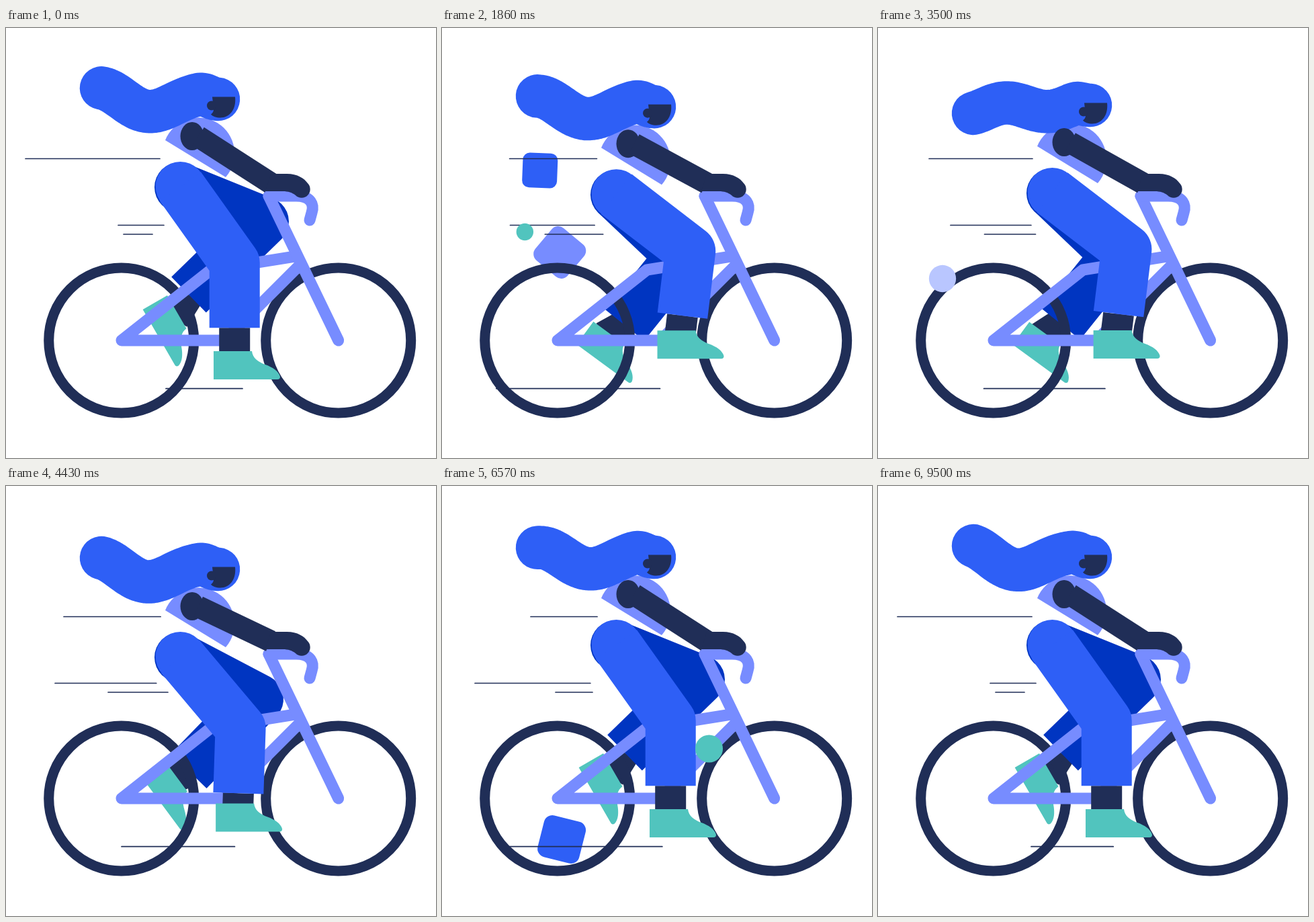
An HTML page with a canvas that plays this animation: 640 px wide and 640 px high, repeating every 9.57 s.

```html
<!DOCTYPE html>
<html lang="en">
<head>
<meta charset="utf-8">
<title>Cyclist</title>
<style>
html, body { margin: 0; width: 100%; height: 100%; overflow: hidden; background: #fff; }
canvas { display: block; }
</style>
</head>
<body>
<canvas id="stage" width="640" height="640"></canvas>
<script>
const ctx = document.getElementById('stage').getContext('2d');
const LOOP = 9570;
const NAVY = '#202e57', BLUE = '#2e5ff6', DEEP = '#0035c1', LILAC = '#778cff', TEAL = '#51c4be', PALE = '#b9c6ff';

const lerp = (a, b, k) => a + (b - a) * k;
const mix = (p, q, k) => [lerp(p[0], q[0], k), lerp(p[1], q[1], k)];
const clamp = k => Math.max(0, Math.min(1, k));
const smooth = k => k * k * (3 - 2 * k);
const ramp = (a, b, x) => smooth(clamp((x - a) / (b - a)));
const polar = ([x, y], deg, r) => [x + r * Math.cos(deg * Math.PI / 180), y + r * Math.sin(deg * Math.PI / 180)];

// Key times shared by the slow body, hair and speed line motion
const BEATS = [0, 1210, 2570, 4430, 6570, 7930, 9500, LOOP];
const BOB = [0, 21, 0, 18, 0, 7, 0, 0];
const HAIR_PHASE = [.21, .93, 1.46, 2.23, 3.15, 3.66, 4.26, 4.28];

function track(values, t, ease = k => k) {
  let i = 1;
  while (i < BEATS.length - 1 && t > BEATS[i]) i++;
  return lerp(values[i - 1], values[i], ease(clamp((t - BEATS[i - 1]) / (BEATS[i] - BEATS[i - 1]))));
}

function line(points, width, color, cap = 'round') {
  ctx.beginPath();
  points.forEach(p => ctx.lineTo(...p));
  Object.assign(ctx, { lineWidth: width, strokeStyle: color, lineCap: cap, lineJoin: 'round' });
  ctx.stroke();
}

function ellipse(x, y, rx, ry, color) {
  ctx.fillStyle = color;
  ctx.beginPath();
  ctx.ellipse(x, y, rx, ry, 0, 0, 7);
  ctx.fill();
}

function placed(x, y, deg, draw) {
  ctx.save();
  ctx.translate(x, y);
  ctx.rotate(deg * Math.PI / 180);
  draw();
  ctx.restore();
}

function fill(path, color) {
  ctx.fillStyle = color;
  ctx.fill(path);
}

const SHOE = new Path2D('M0 0H57C58 10 66 16 77 20C88 24 97 30 99 38Q99 42 95 42H0Z');
const TORSO = new Path2D('M237 167A53.5 53.5 0 1 1 327 222Z');
const FACE = new Path2D('M307 102.5H341C343 121 333 133.5 319 133.5C313 133.5 308 132 305 128.5C308 126 309 124 309 121Z');
const HAND = new Path2D('M394 217H418C434 217 444 224 449 231A12.5 12.5 0 0 1 431 249C426 245 420 243 412 243H386Z');
const BAR = new Path2D('M391 250H432C454 250 459 263 455 275L452 286');

// Speed lines: y, right end when left = pivot, slope of right end, left ends per beat
const SPEED_LINES = [
  { y: 194.5, pivot: 29, right: 229, slope: .02, left: [29, 131, 66, 86, 132, 69, 29, 29] },
  { y: 293.5, pivot: 167, right: 235, slope: .12, left: [167, 65, 143, 73, 49, 130, 167, 167] },
  { y: 307, pivot: 175, right: 218, slope: -1, left: [175, 143, 165, 152, 169, 155, 175, 175] },
  { y: 536.7, pivot: 238, right: 352, slope: .175, left: [238, 26, 143, 172, 100, 140, 228, 238] }
];

// Confetti slows down and shrinks on its way to the left
const SQUARES = [
  { color: BLUE, end: 3492, life: 2600, from: 244, to: 82, y: 212, size: 72, turn: 43 },
  { color: LILAC, end: 3500, life: 2280, from: 312, to: 29, y: 334, size: 79, turn: -9 },
  { color: BLUE, end: 7800, life: 1700, from: 286, to: 60, y: 526, size: 80, turn: 45 }
];
const DOTS = [
  { color: TEAL, end: 2500, life: 1400, from: 478, to: 30, y: 303.5, size: 22 },
  { color: PALE, end: 4280, life: 2000, from: 493, to: 25, y: 373, size: 39 },
  { color: TEAL, end: 8568, life: 2200, from: 476, to: 30, y: 391, size: 22 }
];

function confetti(list, t, draw) {
  for (const c of list) {
    const rest = (c.end - t) / c.life;
    if (rest <= 0 || rest >= 1) continue;
    const size = c.size * rest ** .7 * Math.min(1, (1 - rest) / .06);
    draw(c, lerp(c.to, c.from, rest * rest), size, c.turn - 25 * (c.end - t) / 1000);
  }
}

function square(c, x, size, deg) {
  placed(x, c.y, deg, () => {
    ctx.fillStyle = c.color;
    ctx.beginPath();
    ctx.roundRect(-size / 2, -size / 2, size, size, size * .2);
    ctx.fill();
  });
}

function shoe([x, y], deg) {
  placed(x, y, deg, () => fill(SHOE, TEAL));
}

function farLeg(push, bob) {
  const knee = mix([384, 288], [342, 346], push), hem = mix([272, 397], [272, 446], push);
  const heel = mix([240, 398], [219, 454], push), tilt = lerp(60, 26, push);
  knee[1] += bob;
  hem[1] += bob;
  const ankle = polar(heel, tilt, 30);
  const dir = Math.atan2(ankle[1] - hem[1], ankle[0] - hem[0]) * 180 / Math.PI;
  line([hem, polar(ankle, dir, 10)], 46, NAVY, 'butt');
  shoe(heel, tilt);
  ellipse(258, 237 + bob, 37, 37, DEEP);
  line([[258, 237 + bob], knee, hem], 74, DEEP, 'butt');
}

function nearLeg(push, bob) {
  const hip = [259.5, 236 + bob], shin = 90 + 10 * push;
  const knee = polar(hip, 54.5 - 24.3 * push, 139), hem = polar(knee, shin, 97);
  line([hem, polar(hem, shin, 45)], 46, NAVY, 'butt');
  shoe(mix([309, 481], [325.5, 437], push), 0);
  ellipse(...hip, 37, 37, BLUE);
  line([hip, knee, hem], 75, BLUE, 'butt');
}

function bike() {
  for (const x of [171.7, 494.7]) {
    ctx.beginPath();
    ctx.arc(x, 465, 108, 0, 7);
    ctx.lineWidth = 15;
    ctx.strokeStyle = NAVY;
    ctx.stroke();
  }
  line([[325, 465], [172, 465], [305, 360], [430, 340]], 17, LILAC);
  line([[325, 465], [438, 352]], 17, LILAC);
  line([[391, 250], [494.7, 465]], 17, LILAC);
  ctx.stroke(BAR);
}

// A wave that travels from the head to the tip, growing on its way
function hair(phase) {
  const points = [], length = 145, valley = 250 - length * phase;
  for (let x = 142; x <= 316; x += 3) {
    const k = Math.min(1, (x - 142) / 155);
    const base = 105 - 5 * k + 12 * Math.sin(Math.PI * k);
    const wave = (16 - 13 * k) * Math.cos((x - valley) / length * 2 * Math.PI);
    points.push([x, lerp(base + wave, 106, ramp(286, 316, x))]);
  }
  line(points, 64.5, BLUE);
}

function upperBody(t, bob) {
  ctx.save();
  ctx.translate(0, bob);
  fill(TORSO, LILAC);
  hair(track(HAIR_PHASE, t));
  fill(FACE, NAVY);
  ellipse(306, 115.5, 7, 7, NAVY);
  ellipse(277, 161, 17.5, 21, NAVY);
  ctx.restore();
}

function draw(t) {
  ctx.fillStyle = '#fff';
  ctx.fillRect(0, 0, 640, 640);

  const push = ramp(627, 2570, t) * (1 - ramp(2570, 5153, t));
  const bob = track(BOB, t, smooth);

  confetti(SQUARES, t, square);
  for (const s of SPEED_LINES) {
    const left = track(s.left, t, smooth);
    line([[left, s.y], [s.right + s.slope * (left - s.pivot), s.y]], 1.7, NAVY);
  }

  farLeg(push, bob);
  bike();
  nearLeg(push, bob);
  upperBody(t, bob);
  line([[286, 161.5 + bob], [394, 231]], 32.5, NAVY, 'butt');
  fill(HAND, NAVY);
  confetti(DOTS, t, (c, x, r) => ellipse(x, c.y, r, r, c.color));
}

function tick() {
  draw(performance.now() % LOOP);
  requestAnimationFrame(tick);
}
tick();
</script>
</body>
</html>
```
